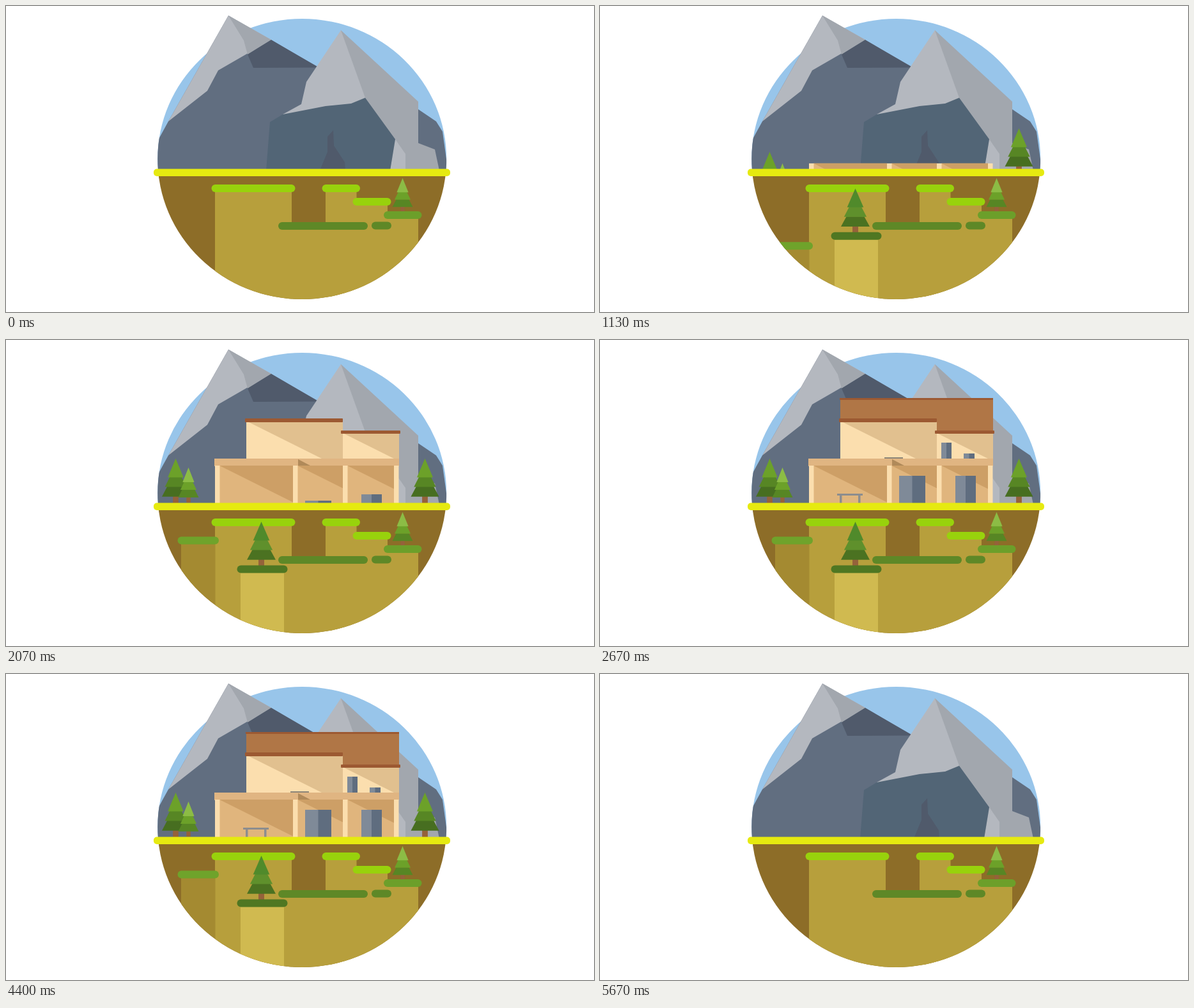
Animation, 920 px wide and 480 px high, one loop 5.79 s. Source, as an HTML page:

```html
<!DOCTYPE html>
<html lang="en">
<head>
<meta charset="utf-8">
<title>House in the mountains</title>
<style>
  html, body { margin: 0; width: 100%; height: 100%; overflow: hidden; background: #fff; }
  svg { display: block; width: 920px; height: 480px; }
</style>
</head>
<body>
<svg id="stage" viewBox="0 0 920 480" xmlns="http://www.w3.org/2000/svg"></svg>
<script>
const LOOP = 5790, STEP = 200 / 3, LAST = 85;
const GROUND = 258, FLOOR = 187, DEEP = 640;   // masks hide what lies below these levels
const GROW = .075, BUILD = .16;                // rising speeds in px per ms

const SNOW = "#b4b8bf", ROCK = "#a2a7ae", SLATE = "#616e80", SHADOW = "#505a6b";
const SOIL = "#b79f3c", PALE = "#fbdeae", TIMBER = "#9c5932", STEEL = "#8c8d8e";
const LEAVES = ["#8cbc45", "#6ca129", "#578624", "#476e20"];
const LIGHT_TREE = LEAVES.slice(0, 3), GREEN_TREE = LEAVES.slice(1);
const DARK_TREE = ["#508a2b", "#5f902c", "#4b7221"];

const poly = (fill, points) => `<polygon fill="${fill}" points="${points}"/>`;
const rect = (fill, x1, y1, x2, y2, r = 0) =>
  `<rect fill="${fill}" x="${x1}" y="${y1}" width="${x2 - x1}" height="${y2 - y1}" rx="${r}"/>`;
const grass = (fill, x1, x2, y) => rect(fill, x1, y - 6, x2, y + 6, 6);
const clip = (id, content) => `<g clip-path="url(#${id})">${content}</g>`;

// Hidden `rise` px lower, a part comes up from time `enter` and sinks twice as fast from `leave`.
const part = (rise, speed, enter, leave, content) =>
  `<g class="part" data-timing="${[rise, speed, enter, leave]}">${content}</g>`;

// Three tiers on a trunk, each wider and starting narrower than the one above ends.
function tree(x, y, h, w, colors) {
  let art = rect("#95623a", x - w * .2, y + h * .8, x + w * .2, y + h);
  for (let i = 2; i >= 0; i--) {
    const top = y + h * .21 * i * (i > 1 ? 1.5 : 1.9), bottom = y + h * (.42 + .217 * i);
    const b = w * (.57 + .215 * i), a = i ? b - w * .38 : 0;
    art += poly(colors[i], `${x - a},${top} ${x + a},${top} ${x + b},${bottom} ${x - b},${bottom}`);
  }
  return art;
}

// The same light falls on every wall: shade below a slope of one in two.
const room = (wall, shade, x1, y1, x2, y2) => rect(wall, x1, y1, x2, y2) +
  poly(shade, `${x1},${y1} ${x2},${y1} ${x2},${y1 + (x2 - x1) / 2}`);
const upperRoom = (x1, x2, y) => room(PALE, "#e1c08f", x1, y, x2, FLOOR);
const door = (x, y, w, base) =>
  rect("#7f8a98", x, y, x + w, base) + rect("#5f6d7f", x + w / 2, y, x + w, base);

// A block of earth with overhanging grass.
const ledge = (earth, green, x1, x2, y) =>
  rect(earth, x1, y, x2, DEEP) + grass(green, x1 - 5.5, x2 + 5.5, y);

const sky = rect("#98c5ea", 230, 15, 700, 262);

const farMountain =
  poly(SLATE, "348,15 489,96 560,262 692,262 683,197 673,181 645,162 560,262 230,262 230,225 254,181") +
  poly(SNOW, "348,15 254,181 315,133 332,101 415,53") +
  poly(ROCK, "348,15 415,53 378,76 372,54") +
  poly(SHADOW, "415,53 489,96.5 387,97 378,76");

const nearMountain =
  poly(ROCK, "524,38 645,150 645,215 671,225 678,258 510,258") +
  poly(SNOW, "524,38 470,119 462,154 433,170 500,170 562,144") +
  poly(SNOW, "609,209 625,232 625,258 601,258") +
  poly("#526576", "433,170 500,157 540,153 562,144 609,209 601,258 407,258 413,182") +
  poly(SHADOW, "512,195 513,219 530,245 531,258 491,258 503,229 503,205");

const upstairs =
  part(53, .2, 2400, 4430,
    rect("#b07646", 376, 92, 615, 126) + rect("#b07646", 526, 126, 615, 144) +
    rect(TIMBER, 375, 91, 615, 94)) +
  part(63, BUILD, 1660, 4715, upperRoom(376, 527, 127) + rect(TIMBER, 374, 123, 527, 129, 1)) +
  part(45, BUILD, 1775, 4770, upperRoom(527, 615, 146) + rect(TIMBER, 524, 142, 617, 147, 1)) +
  part(26, BUILD, 2300, 4480, door(534, 161, 16, FLOOR)) +
  part(9, BUILD, 2400, 4440, door(569, 178, 17, FLOOR)) +
  part(3, BUILD, 2450, 4440, rect("#8b8578", 445, 184, 474, FLOOR));

const beam = part(11, BUILD, 1500, 4885,
  rect("#e0b582", 326, 186, 615, 198) + poly("#b08a5a", "457,187 476,197 457,197"));

const posts = [327, 449, 527, 607];
const groundFloor = part(60, BUILD, 1070, 4940, posts.map((x, i) =>
  (i < 3 ? room("#e0b57d", "#cd9f66", x + 7, 197, posts[i + 1], GROUND) : "") +
  rect(PALE, x, 197, x + 7.5, GROUND)).join(""));

const furniture =
  part(43, BUILD, 1980, 4811, door(556, 213, 32, GROUND)) +
  part(43, BUILD, 2042, 4740, door(468, 213, 41, GROUND)) +
  part(15, BUILD, 2400, 4440, rect(STEEL, 371, 241, 411, 244) +
    [375, 404].map(x => rect(STEEL, x, 244, x + 3.5, GROUND)).join(""));

const trees =
  part(70, GROW, 770, 4712, tree(265.5, 186, 70, 21.5, GREEN_TREE)) +
  part(56, GROW, 1010, 4666, tree(285.5, 200, 55, 16, LIGHT_TREE)) +
  part(70, GROW, 280, 5110, tree(655.5, 186, 70, 22, GREEN_TREE));

const underground =
  rect("#8d6d28", 230, 262, 700, 470) +
  rect(SOIL, 440, 345, 600, DEEP) +
  ledge(SOIL, "#98d20c", 327, 447, 286) +
  ledge(SOIL, "#98d20c", 500, 548.5, 286) +
  ledge(SOIL, "#98d20c", 548, 597, 307) +
  tree(620.5, 270, 53, 16, LIGHT_TREE) +
  ledge(SOIL, "#6c9f2a", 596.5, 645, 328) +
  grass("#5e8827", 426, 566, 345) +
  grass("#5e8827", 572, 603, 344.5) +
  part(107, .085, 600, 4745, ledge("#a48a31", "#6fa32b", 274, 327.5, 314.5)) +
  part(170, .32, 606, 5243,
    tree(399.5, 285, 70, 22.5, DARK_TREE) +
    ledge("#d0ba50", "#4f7722", 367, 435, 359.5));

const above = (id, y) => `<clipPath id="${id}"><rect width="920" height="${y}"/></clipPath>`;
const disc = `<ellipse cx="463.2" cy="240" rx="226" ry="220"/>`;
const stage = document.getElementById("stage");
stage.innerHTML = `<defs>
  <clipPath id="disc">${disc}</clipPath>
  <clipPath id="peaks">${disc}<rect width="600" height="150"/></clipPath>
  ${above("surface", GROUND) + above("storey", FLOOR) + above("ceiling", 198)}
</defs>` +
  clip("disc", sky) +
  clip("peaks", farMountain) +
  nearMountain +
  clip("storey", upstairs) +
  clip("ceiling", beam) +
  clip("surface", groundFloor + furniture + trees) +
  clip("disc", underground) +
  rect("#e6ea10", 231, 255.5, 695, 267, 5);

const parts = [...stage.querySelectorAll(".part")].map(el => {
  const [rise, speed, enter, leave] = el.dataset.timing.split(",").map(Number);
  return { el, rise, speed, enter, leave };
});
const clamp = (v, max) => Math.min(max, Math.max(0, v));

function draw(time) {
  const t = Math.min(LAST, Math.floor((time % LOOP + 4) / STEP)) * STEP;
  for (const { el, rise, speed, enter, leave } of parts) {
    const up = clamp((t - enter) * speed, rise) - clamp((t - leave) * speed * 2, rise);
    el.style.display = up > 0 ? "" : "none";
    el.setAttribute("transform", `translate(0 ${(rise - up).toFixed(2)})`);
  }
}

const start = performance.now();
function tick() {
  draw(performance.now() - start);
  requestAnimationFrame(tick);
}
tick();
</script>
</body>
</html>
```
